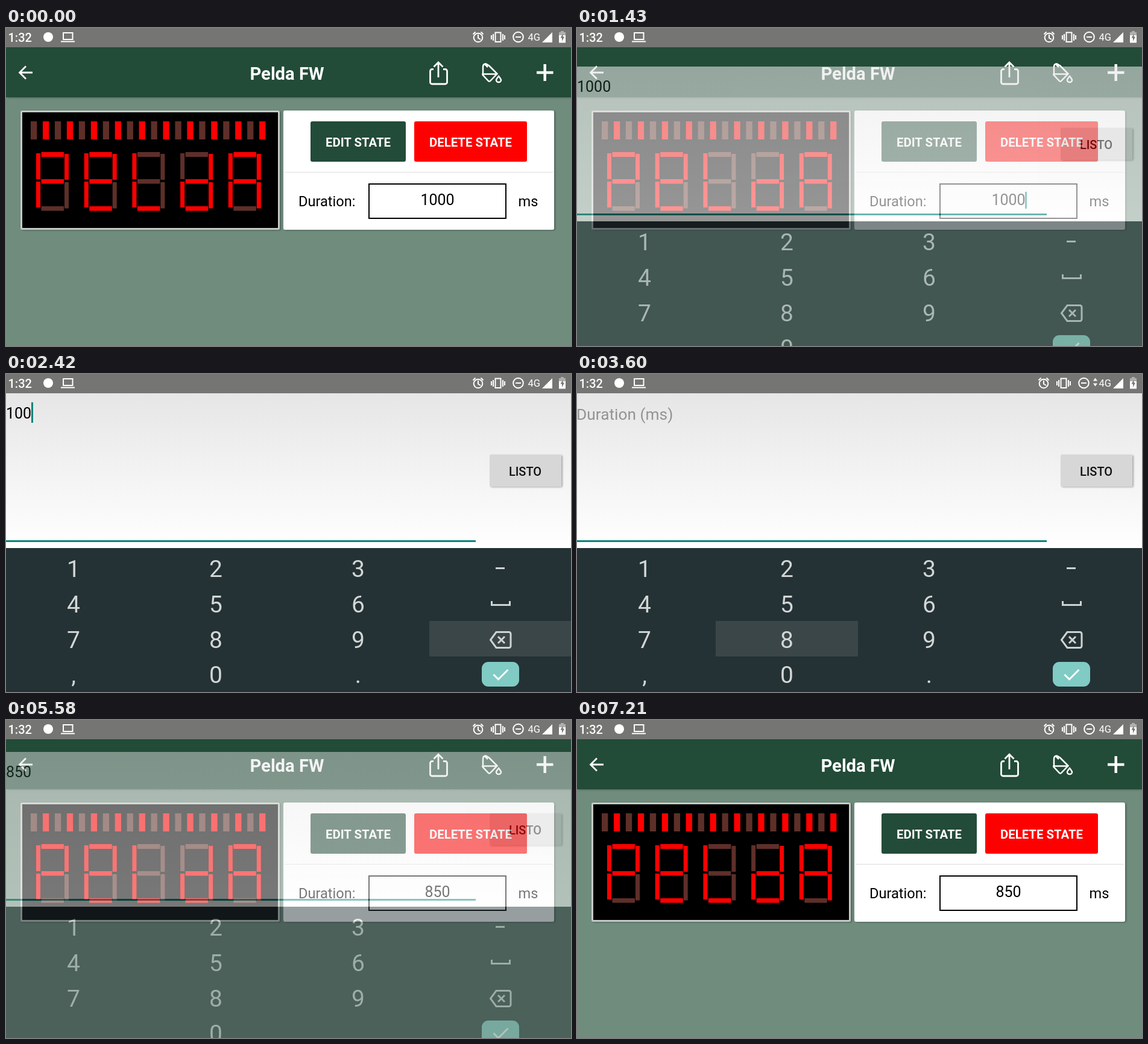
An HTML page that plays this animation: 937x528 px, repeating every 7.38 s.

```html
<!DOCTYPE html>
<html lang="en">
<meta charset="utf-8">
<title>Duration editor</title>
<style>
html, body { margin: 0; width: 937px; height: 528px; overflow: hidden; background: #6f8c7d }
svg { display: block; font-family: Roboto, sans-serif }
.mid { text-anchor: middle }
.line { fill: none; stroke: #fff; stroke-width: 2 }
.bold { font-weight: 700; fill: #fff }
</style>
<svg width="937" height="528" viewBox="0 0 937 528">
  <defs>
    <linearGradient id="fade" x2="0" y2="1"><stop stop-color="#e5e6e5"/><stop offset="1" stop-color="#fefffe"/></linearGradient>
    <filter id="shadow" x="-10%" y="-10%" width="120%" height="125%"><feDropShadow dy="1" stdDeviation="1.5" flood-opacity=".3"/></filter>
  </defs>

  <g id="main">
    <path fill="#6f8c7d" d="M0 32h937v496H0z"/>
    <path fill="#234b39" d="M0 32h937v83H0z" filter="url(#shadow)"/>
    <g class="line" stroke-width="3">
      <path style="stroke-width:2.8" d="M44 74H23M33 63.5L22.500 74l10.500 10.500"/>
      <path style="stroke-width:2.8" d="M709 68.500h-2.500a3 3 0 0 0-3 3V90a3 3 0 0 0 3 3h22a3 3 0 0 0 3-3V71.500a3 3 0 0 0-3-3H725M717 82V57m-7.500 7.500l7.500-7.500 7.500 7.500"/>
      <path style="stroke-width:2.5" d="M793 59l6 6M801 62.500L814.500 76 803 88a2 2 0 0 1-3 0l-9-9.500a2 2 0 0 1 0-3V64.500q0-5 5-5zM791 76.500h23M817 80q-4 5-4 6.500a4 3.500 0 0 0 8 0q0-1.500-4-6.500z"/>
      <path style="stroke-width:4.500" d="M880 74h27.500M893.700 60v28"/>
    </g>
    <text class="bold mid" x="466" y="85.500" font-size="29.200">Pelda FW</text>

    <rect x="24" y="137" width="430" height="198" rx="3" fill="#c5c9c5" filter="url(#shadow)"/>
    <path d="M27 140h424v192H27z"/>
    <g id="leds"></g>

    <rect x="460" y="137" width="449" height="198" rx="3" fill="#fff" filter="url(#shadow)"/>
    <path stroke="#dcdcdc" d="M462 239.500h445"/>
    <rect x="505" y="155" width="158" height="67" rx="3" fill="#234b39"/>
    <rect x="677" y="155" width="187" height="67" rx="3" fill="red"/>
    <g class="bold mid" font-size="20.400">
      <text x="584" y="196.500">EDIT STATE</text>
      <text x="770.500" y="196.500">DELETE STATE</text>
    </g>
    <g font-size="23.600">
      <text x="485" y="296">Duration:</text>
      <text x="849.500" y="296">ms</text>
    </g>
    <path fill="#fff" stroke="#000" stroke-width="2" d="M602 259h227v57H602z"/>
    <text id="field" class="mid" x="715.500" y="294" font-size="25"></text>
    <path id="fieldCaret" fill="#00897b" d="M743 272h3v28h-3z"/>
  </g>

  <g id="panel">
    <path fill="url(#fade)" d="M0 32h937v257H0z"/>
    <text id="hint" x="-1" y="76" font-size="26.300" fill="#929492">Duration (ms)</text>
    <text id="value" x="0" y="74" font-size="25"></text>
    <path id="caret" fill="#00857a" d="M0 47h3v34H0z"/>
    <path fill="#08857b" d="M0 276h779v3H0z"/>
    <rect x="802" y="134" width="119" height="53" rx="2" fill="#d6d7d6" filter="url(#shadow)"/>
    <text class="mid" x="861" y="168.500" font-size="20" font-weight="500" fill="#111">LISTO</text>
    <path fill="#243235" d="M0 289h937v239H0z"/>
    <rect id="press" height="59" fill="#3a4648"/>
    <g id="keys" class="mid" font-size="39" fill="#d3d6d6"></g>
    <g class="line" style="stroke:#cfd3d3;stroke-width:3">
      <path d="M812 322.500h15M805.500 377v6.500h30V377"/>
      <path d="M813 428.500h21a3 3 0 0 1 3 3v20a3 3 0 0 1-3 3h-21l-9.500-13zM816 436l11 11m0-11l-11 11"/>
    </g>
    <rect x="789" y="478" width="62" height="41" rx="11" fill="#80cbc4"/>
    <path class="line" style="stroke-width:3" d="M808.500 499l8 8 16-16"/>
  </g>

  <g id="status">
    <path fill="#757673" d="M0 0h937v32H0z"/>
    <text x="3.500" y="22.500" font-size="20" font-weight="500" fill="#fff">1:32</text>
    <circle cx="70" cy="15" r="8" fill="#fff"/>
    <path class="line" d="M95 8h15.500v11H95zM91 22.500h23"/>
    <g id="icons" class="line">
      <circle cx="783" cy="16" r="7.300"/>
      <path d="M783 11v5.500l4 2.500M774.500 10.500l4-4M791.500 10.500l-4-4M811.500 7.500h9v15.500h-9zM808 10v11M805 12v7M824 10v11M827 12v7"/>
      <circle cx="849.500" cy="15" r="8.300"/>
      <path d="M845 15h9"/>
    </g>
    <path id="traffic" fill="#fff" d="M856 11.500l3.500-5 3.500 5zM856 15.500l3.500 5 3.500-5z"/>
    <text x="865.500" y="21" font-size="16.500" fill="#fff">4G</text>
    <path fill="#fff" d="M889 24h17V7z"/>
    <path fill="#b0b1af" d="M920 5h5v2h3v5h-11V7h3z"/>
    <path fill="#fff" d="M917 12h11v12.500h-11z"/>
    <path fill="#757673" d="M923.500 9.500l-4 7h2.500v5.500l4-7.500h-2.500z"/>
  </g>
</svg>
<script>
const LOOP = 7380;
const $ = id => document.getElementById(id);
const rect = (x, y, w, h, lit) =>
  `<rect x="${x}" y="${y}" width="${w}" height="${h}" fill="${lit ? 'red' : '#5e2f29'}"/>`;

// Segments a-g: top, upper right, lower right, bottom, lower left, upper left, middle
const SEGMENTS = {
  a: [8.5, 206, 37.5, 8], b: [47, 209, 7, 43], c: [47, 256, 7, 43.5], d: [8.5, 296, 37.5, 7.5],
  e: [0, 255, 7, 43], f: [0, 208, 7, 43], g: [8.5, 251, 37.5, 7.5]
};
const LETTERS = ['abefg', 'abdefg', 'def', 'bcdeg', 'abcefg'];

let leds = '';
for (let i = 0; i < 20; i++) leds += rect(41 + i * 19.95, 155, 10.3, 30, i % 2);
LETTERS.forEach((lit, i) => {
  for (const [name, [x, y, w, h]] of Object.entries(SEGMENTS))
    leds += rect(50 + i * 79.7 + x, y, w, h, lit.includes(name));
});
$('leds').innerHTML = leds;

$('keys').innerHTML = [...'123456789,0.'].map((key, i) =>
  `<text x="${112 + i % 3 * 236}" y="${337 + Math.floor(i / 3) * 58.8}">${key}</text>`).join('');

// Key areas: x, y, width
const KEYS = { del: [702, 410, 235], 5: [230, 351, 236], 8: [230, 410, 236], 0: [230, 469, 236] };

// Each list holds [start time, value...]
const TEXT = [[0, '1000'], [2270, '100'], [2500, '10'], [2740, '1'], [2970, ''],
  [3760, '8'], [4310, '85'], [4730, '850']];
const PRESSED = [[0, ''], [2120, 'del'], [2270, ''], [2420, 'del'], [2580, ''], [2660, 'del'],
  [2820, ''], [2970, 'del'], [3050, ''], [3600, '8'], [3840, ''], [4230, '5'], [4400, ''],
  [4560, '0'], [4820, '']];
const CARET = [[0, 0], [1650, 1], [3430, 0], [3760, 1], [5260, 0]];
const PANEL = [[0, 42, 0], [1430, 32, .59], [1490, 14, .87], [1570, 4, 1], [1650, 0, 1],
  [5500, 7, .83], [5580, 21, .47], [5660, 40, .1], [5730, 42, 0]];

const at = (list, t) => list.findLast(step => step[0] <= t).slice(1);
const show = (id, on) => $(id).style.display = on ? '' : 'none';

function draw(t) {
  const [text] = at(TEXT, t), [key] = at(PRESSED, t), [caret] = at(CARET, t);
  const [y, alpha] = at(PANEL, t);

  $('field').textContent = t < 5260 ? '1000' : '850';
  show('fieldCaret', t >= 1250 && t < 5260);

  $('panel').setAttribute('transform', `translate(0 ${y})`);
  $('panel').setAttribute('opacity', alpha);
  show('panel', alpha);
  $('value').textContent = text;
  show('hint', !text);
  show('caret', caret);
  $('caret').setAttribute('transform', `translate(${text.length * 14} 0)`);

  show('press', key);
  if (key) ['x', 'y', 'width'].forEach((name, i) => $('press').setAttribute(name, KEYS[key][i]));

  const traffic = t >= 3430 && t < 4310;
  show('traffic', traffic);
  $('icons').setAttribute('transform', `translate(${traffic ? -9 : 0} 0)`);
}

function tick() {
  draw(performance.now() % LOOP);
  requestAnimationFrame(tick);
}
tick();
</script>
</html>
```
